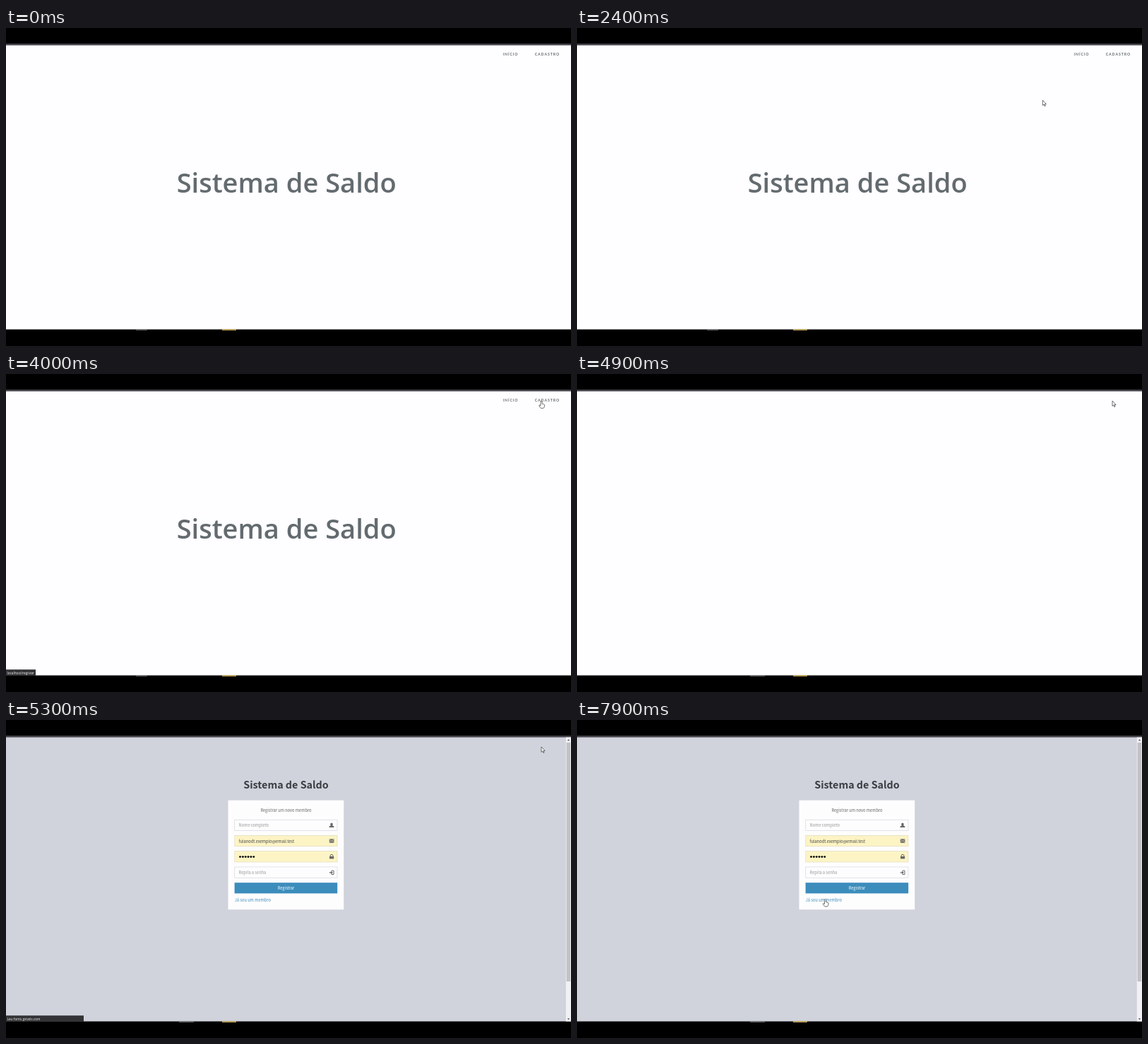
Write an HTML page that moves like this. It is 800 px wide and 450 px high and loops after 8000 ms.

```html
<!DOCTYPE html>
<html lang="pt-BR">
<head>
<meta charset="utf-8">
<title>Sistema de Saldo</title>
<style>
html, body { margin: 0; width: 100%; height: 100%; overflow: hidden; background: #000; }
svg { display: block; width: 100%; height: 100%; }
.title { font: 600 38px "Open Sans", sans-serif; fill: #636b6f; }
.nav { font: 700 5.2px Lato, sans-serif; letter-spacing: .95px; fill: #636b6f; }
.form { font: 400 5.7px "Noto Sans CJK JP", "Noto Sans CJK SC", "Noto Sans CJK", sans-serif; }
.logo { font-size: 14.3px; font-weight: 700; fill: #3a3d42; }
.mid { text-anchor: middle; }
.status { font: 4.75px "Open Sans", sans-serif; fill: #f2f2f2; }
</style>
</head>
<body>
<svg viewBox="0 0 800 450">
  <rect width="800" height="450"/>
  <rect y="22" width="800" height="3" fill="#424146"/>
  <rect id="page" y="24.5" width="800" height="402"/>

  <g id="home">
    <text class="nav" x="703.5" y="39">INÍCIO</text>
    <text class="nav" x="748.7" y="39">CADASTRO</text>
    <text class="title" x="241.7" y="232.6">Sistema de Saldo</text>
  </g>

  <g id="register" class="form">
    <rect id="card" x="314.5" y="113.7" width="163.7" height="154.5" fill="#fefdfe"/>
    <text class="logo mid" x="396.5" y="97">Sistema de Saldo</text>
    <text class="mid" x="396.5" y="129.8" fill="#666">Registrar um novo membro</text>
    <g id="fields"></g>
    <rect id="button" x="323.6" y="230.2" width="145.6" height="15.2"/>
    <text class="mid" x="396.5" y="240" fill="#fff">Registrar</text>
    <text x="323.8" y="257.2" fill="#3c8dbc">Já sou um membro</text>
    <g id="icons" fill="#666">
      <path d="M461 145.8a1.7 1.9 0 0 1 1 3.5l2.4 1.2v1.6h-6.8v-1.6l2.4-1.2a1.7 1.9 0 0 1 1-3.5z"/>
      <path d="M457.8 168.4h6.6v5.4h-6.6z"/>
      <path d="M458 168.8l3.1 2.6 3.1-2.6M458 173.4l2.2-2.4M464.2 173.4l-2.2-2.4" fill="none" stroke="#fcf4c4" stroke-width=".6"/>
      <path d="M458 193h6.2v3.4H458z"/>
      <path d="M459.2 193v-1a1.9 1.7 0 0 1 3.8 0v1" fill="none" stroke="#666"/>
      <path d="M460.6 213.2h3.4v5.4h-3.4" fill="none" stroke="#666"/>
      <path d="M457.8 215.2h2.4v-1.6l2.6 2.3-2.6 2.3v-1.6h-2.4z"/>
    </g>
  </g>

  <g id="scroll">
    <rect x="792.8" y="24.5" width="7.2" height="402" fill="#f1f0f3"/>
    <rect x="793.6" y="32" width="5.6" height="338" fill="#c2c2c5"/>
    <path d="M794.8 29.2l1.7-2 1.7 2zM794.8 422.2l1.7 2 1.7-2z" fill="#505050"/>
  </g>

  <rect id="task" y="426.5" height="1.3" fill="#77777a"/>
  <rect x="306" y="426" width="20" height="2" fill="#b8a05c"/>

  <g id="status">
    <rect id="statusBox" y="418.2" height="8.8" fill="#333336"/>
    <text id="statusText" class="status" x="1.5" y="424.6"></text>
  </g>

  <g id="cursor" stroke-linejoin="round" stroke-width=".7">
    <path id="arrow" d="M0 0V7.4L1.7 5.9 2.9 8.6 4.1 8 2.9 5.5H5.1Z" fill="#fff" stroke="#333"/>
    <path id="hand" d="M-1 1Q-1 0 0 0T1 1V4L3.6 4.8Q4.8 5.2 4.6 6.5L4 9.2Q3.6 10.4 2.5 10.4H-.2Q-1 10.4-1.6 9.4L-3.2 7Q-3.4 6-2.3 6L-1 7Z" fill="#fff" stroke="#333"/>
    <path id="beam" d="M-1.5-3H1.5M0-3V3.6M-1.5 3.6H1.5" fill="none" stroke="#222"/>
  </g>
</svg>
<script>
const LOOP = 8000, STEP = 100;
const $ = id => document.getElementById(id);
const set = (id, attrs) => { for (const k in attrs) $(id).setAttribute(k, attrs[k]); };
const show = (id, on) => set(id, { display: on ? 'inline' : 'none' });

const rowY = i => 141.2 + 22.25 * i;
const rows = ['Nome completo', 'fulanodt.exemplo@email.test', '', 'Repita a senha'];

$('fields').innerHTML = rows.map((label, i) => {
  const y = rowY(i), filled = i === 1 || i === 2;
  const dots = Array.from({ length: 6 }, (_, n) =>
    `<circle cx="${331.5 + 3.85 * n}" cy="${y + 7.9}" r="1.45"/>`).join('');
  return `<rect x="323.8" y="${y}" width="145.2" height="15.3" stroke="${filled ? '#dcd7bc' : '#cdd1da'}"
    stroke-width=".6" fill="${filled ? '#fcf4c4' : '#fefdfe'}"/>` +
    (label ? `<text x="329.6" y="${y + 10.1}" fill="${filled ? '#444' : '#979797'}">${label}</text>` : dots);
}).join('');

// Each move starts where the last one ended; bend arches it down (+) or up (-).
const entry = { x: 768, y: 522 };
const moves = [
  { from: 800, to: 1100, x: 324, y: 203 },
  { from: 1300, to: 2200, x: 608, y: 108, bend: -91 },
  { from: 2300, to: 3200, x: 760, y: 43, bend: 18, ease: 3.5 },
  { from: 3200, to: 3700, x: 758, y: 38 },
  { from: 5600, to: 6400, x: 375, y: 179 },
  { from: 6500, to: 7200, x: 440, y: 235, bend: -43 },
  { from: 7400, to: 7600, x: 489, y: 186 },
  { from: 7600, to: 7900, x: 351.5, y: 253.5 }
];

function pointer(t) {
  let { x, y } = entry;
  for (const { from, to, x: toX, y: toY, bend = 0, ease = 1 } of moves) {
    if (t < from) break;
    const k = 1 - (1 - Math.min(1, (t - from) / (to - from))) ** ease;
    x += (toX - x) * k;
    y += (toY - y) * k + bend * 4 * k * (1 - k);
  }
  return [x, y];
}

const inside = (x, y, l, t, r, b) => x >= l && x <= r && y >= t && y <= b;

function draw(t) {
  const home = t < 4900, form = t >= 5000, styled = t >= 5300;
  const [x, y] = pointer(t);
  const onButton = styled && inside(x, y, 323, 230, 469, 246);
  const onLink = styled && inside(x, y, 323, 250, 376, 260);
  const onNav = t < 4200 && inside(x, y, 740, 33, 794, 41);
  const onField = styled && rows.some((_, i) => inside(x, y, 323, rowY(i), 469, rowY(i) + 15.8));

  show('home', home);
  show('register', form);
  for (const id of ['card', 'icons', 'scroll']) show(id, styled);
  set('page', { fill: styled ? '#d1d3dc' : '#fefdff' });
  set('register', { transform: styled ? '' : 'translate(3.5 .7)' });
  set('button', { fill: onButton ? '#367fa9' : '#3c8dbc' });
  set('task', home ? { x: 184, width: 16 } : { x: 245, width: 21 });

  const link = t >= 3900 && t < 4300, loading = t >= 5000 && t < 5600;
  show('status', link || loading);
  set('statusBox', { width: loading ? 110 : 42 });
  $('statusText').textContent = loading ? 'Leu fonts.gstatic.com' : 'localhost/register';

  const hand = onNav || onButton || onLink;
  show('cursor', t >= 900);
  set('cursor', { transform: `translate(${x} ${y})` });
  show('hand', hand);
  show('beam', onField);
  show('arrow', !hand && !onField);
}

const start = performance.now();
function tick() {
  const t = (performance.now() - start) % LOOP;
  draw(Math.floor(t / STEP) * STEP);
  requestAnimationFrame(tick);
}
tick();
</script>
</body>
</html>
```
